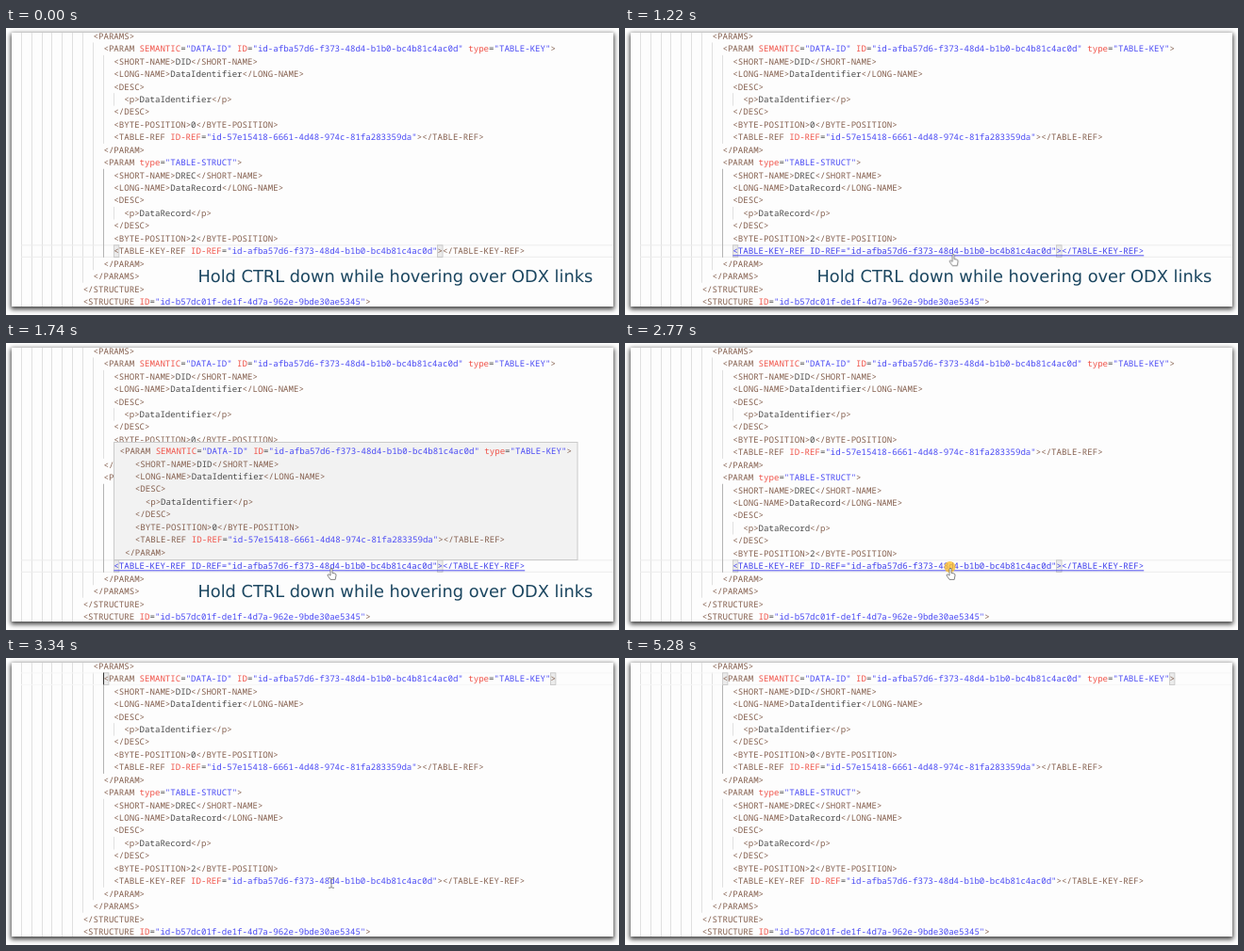
An HTML page for the animation above (5450 ms loop, 650 px wide and 305 px high).

```html
<!DOCTYPE html>
<html lang="en">
<head>
<meta charset="utf-8">
<title>ODX link hover</title>
<style>
html, body { margin: 0; width: 100%; height: 100%; overflow: hidden; background: #fff; }
#card {
  position: absolute; left: 6px; top: 5px; width: 638px; height: 291px;
  background: #fdfdfd; box-shadow: 0 2px 5px 1px rgba(0, 0, 0, .75);
}
svg { position: absolute; left: 0; top: 0; width: 650px; height: 305px; }
text { white-space: pre; text-rendering: geometricPrecision; }
.code { font: 9.08px "Noto Sans Mono", monospace; fill: #4a4a4a; }
.tag { fill: #85604f; }
.attr { fill: #f0544a; }
.val { fill: #4a4af4; }
.link, .link * { fill: #3c3cec; }
#caption { font: 17.8px "DejaVu Sans", Verdana, sans-serif; fill: #1b4660; }
.guide { fill: #e0e0e0; }
.active { fill: #b4b4b4; }
.bracket { fill: rgba(0, 0, 0, .07); stroke: #c4c4c4; stroke-width: .8; }

/* One shared 5450 ms timeline */
.anim { animation: 5450ms step-end infinite; }
#before { animation-name: before; }
#after { animation-name: after; }
#plain { animation-name: plain; }
#linked { animation-name: linked; }
#hand { animation-name: hand; }
#beam { animation-name: beam; }
#tip { animation-name: tip; }
#caption { animation-name: caption; }
#halo { animation-name: halo; }
#range { animation-name: range; }
#caret { animation-name: caret; }
#pointer { animation-name: move; }

@keyframes before { 0% { opacity: 1 } 53.9%, 100% { opacity: 0 } }
@keyframes after { 0% { opacity: 0 } 53.9%, 100% { opacity: 1 } }
@keyframes plain { 0% { opacity: 1 } 19.4% { opacity: 0 } 53.9%, 100% { opacity: 1 } }
@keyframes linked { 0% { opacity: 0 } 19.4% { opacity: 1 } 53.9%, 100% { opacity: 0 } }
@keyframes hand { 0% { opacity: 0 } 19.4% { opacity: 1 } 55.4%, 100% { opacity: 0 } }
@keyframes beam {
  0% { opacity: 0 } 3.8% { opacity: 1 } 19.4% { opacity: 0 }
  55.4% { opacity: 1 } 91.3%, 100% { opacity: 0 }
}
@keyframes tip {
  0% { opacity: 0 } 29.5% { opacity: .13 } 30.6% { opacity: .55 }
  31.9% { opacity: 1 } 50.8%, 100% { opacity: 0 }
}
@keyframes caption { 0% { opacity: 1 } 50.8%, 100% { opacity: 0 } }
@keyframes halo { 0% { opacity: 0 } 50.8% { opacity: .8 } 53.9%, 100% { opacity: 0 } }
@keyframes range { 0% { opacity: 0 } 53.9% { opacity: 1 } 61.2%, 100% { opacity: 0 } }
@keyframes caret { 0% { opacity: 0 } 53.9% { opacity: 1 } 96.8%, 100% { opacity: 0 } }
@keyframes move {
  0% { transform: translate(490.5px, 284.5px) }
  3.8% { transform: translate(490.5px, 284.5px); animation-timing-function: steps(7, end) }
  13.7% { transform: translate(374.5px, 250.5px) }
  15% { transform: translate(364px, 246.5px); animation-timing-function: steps(6, end) }
  23.8% { transform: translate(345px, 239px) }
  81.2% { transform: translate(345px, 239px); animation-timing-function: steps(7, start) }
  91.3%, 100% { transform: translate(610.5px, 292px) }
}
</style>
</head>
<body>
<div id="card"></div>
<svg viewBox="0 0 650 305">
  <defs><clipPath id="clip"><rect x="6" y="5" width="638" height="291"/></clipPath></defs>
  <g clip-path="url(#clip)">
    <g id="range" class="anim" fill="#fffecb"></g>
    <g id="guides"></g>
    <g id="before" class="anim"></g>
    <g id="after" class="anim"></g>
    <g id="lines"></g>
    <g id="plain" class="anim"></g>
    <g id="linked" class="anim"></g>
    <rect id="caret" class="anim" x="103" y="15.6" width="1" height="12.8" fill="#333"/>
    <g id="tip" class="anim">
      <rect x="114.5" y="105.5" width="491.5" height="125" fill="#f2f2f2" stroke="#cacaca"/>
    </g>
    <text id="caption" class="anim" x="203.4" y="270.4">Hold CTRL down while hovering over ODX links</text>
    <g id="pointer" class="anim">
      <circle id="halo" class="anim" cx="-.5" cy="-1" r="6" fill="#ffc02e"/>
      <path id="beam" class="anim" fill="none" stroke="#777" stroke-width=".9"
        d="M-3-5.2H-1L0-4.5 1-5.2H3M0-4.5V4.5M-3 5.2H-1L0 4.5 1 5.2H3"/>
      <path id="hand" class="anim" fill="#fff" stroke="#666" stroke-width=".8"
        d="M-1 .8Q0-.4 1 .8V5.4L4 6Q5.3 6.4 5 8L4.2 12.4H-1L-4 8Q-4 6.4-2.4 7L-1 8.2Z"/>
    </g>
  </g>
</svg>
<script>
const CHAR = 5.448, PITCH = 13.435, LEFT = 16.3;
const KEY = 'id-afba57d6-f373-48d4-b1b0-bc4b81c4ac0d';
const TABLE = 'id-57e15418-6661-4d48-974c-81fa283359da';
const FOCUS = 17; // row of the hovered link

const record = (head, id, name, pos, ref) => [
  [8, head],
  [9, `<SHORT-NAME>${id}</SHORT-NAME>`],
  [9, `<LONG-NAME>${name}</LONG-NAME>`],
  [9, '<DESC>'],
  [10, `<p>${name}</p>`],
  [9, '</DESC>'],
  [9, `<BYTE-POSITION>${pos}</BYTE-POSITION>`],
  [9, ref],
  [8, '</PARAM>'],
];
const first = record(`<PARAM SEMANTIC="DATA-ID" ID="${KEY}" type="TABLE-KEY">`,
  'DID', 'DataIdentifier', 0, `<TABLE-REF ID-REF="${TABLE}"></TABLE-REF>`);
const rows = [
  [7, '<PARAMS>'],
  ...first,
  ...record('<PARAM type="TABLE-STRUCT">', 'DREC', 'DataRecord', 2,
    `<TABLE-KEY-REF ID-REF="${KEY}"></TABLE-KEY-REF>`),
  [7, '</PARAMS>'],
  [6, '</STRUCTURE>'],
  [6, '<STRUCTURE ID="id-b57dc01f-de1f-4d7a-962e-9bde30ae5345">'],
];

const $ = id => document.getElementById(id);
const colX = level => LEFT + level * 2 * CHAR;
const rowTop = row => 2 + row * PITCH;

function add(parent, name, attrs) {
  const el = document.createElementNS('http://www.w3.org/2000/svg', name);
  for (const k in attrs) el.setAttribute(k, attrs[k]);
  return parent.appendChild(el);
}

function rect(parent, x, y, width, height, attrs) {
  return add(parent, 'rect', { x, y, width, height, ...attrs });
}

function code(parent, x, y, source, cls = '') {
  const text = add(parent, 'text', { x, y, class: 'code ' + cls });
  for (const part of source.match(/<\/?[\w-]+|>|"[^"]*"|[\w-]+(?==)|=|\s+|\w+/g)) {
    const before = text.textContent;
    const inTag = before.lastIndexOf('<') > before.lastIndexOf('>');
    const kind = /^[<>]/.test(part) ? 'tag' : part[0] === '"' ? 'val'
      : inTag && /\w/.test(part) ? 'attr' : '';
    add(text, 'tspan', { class: kind }).textContent = part;
  }
}

function guide(parent, level, from, to, cls = 'guide') {
  rect(parent, Math.floor(colX(level)), rowTop(from), 1, (to - from + 1) * PITCH, { class: cls });
}

// Current line, matching brackets and the active indent guide
function focus(parent, row, from, to, edge) {
  const [level, source] = rows[row];
  for (const y of [rowTop(row), rowTop(row + 1) - 1]) rect(parent, 16, y, 628, 1, { fill: edge });
  guide(parent, 8, from, to, 'active');
  for (const i of [0, source.indexOf('>')])
    rect(parent, colX(level) + i * CHAR, rowTop(row) + .4, CHAR, PITCH - .8, { class: 'bracket' });
}

for (let k = 0; k < 6; k++) guide($('guides'), k, 0, 22);
[[6, 0, 19], [7, 1, 18], [8, 2, 8], [8, 11, 17], [9, 5, 5], [9, 14, 14]]
  .forEach(g => guide($('guides'), ...g));

focus($('before'), FOCUS, 11, 17, '#ececec');
focus($('after'), 1, 2, 8, '#f6f6f6');

rows.forEach(([level, source], row) => {
  const x = colX(level), y = 11.8 + row * PITCH;
  code($(row === FOCUS ? 'plain' : 'lines'), x, y, source);
  if (row === FOCUS) {
    code($('linked'), x, y, source, 'link');
    rect($('linked'), x, y + 1.2, source.length * CHAR, .9, { fill: '#3c3cec' });
  }
});

first.forEach(([level, source], i) => {
  const start = i ? LEFT : colX(level);
  rect($('range'), start, rowTop(i + 1), colX(level) + source.length * CHAR - start, PITCH + .1);
  code($('tip'), 120.5 + (i ? 1 + (level - 8) * 2 : 0) * CHAR, 118.1 + i * PITCH, source);
});
</script>
</body>
</html>
```
